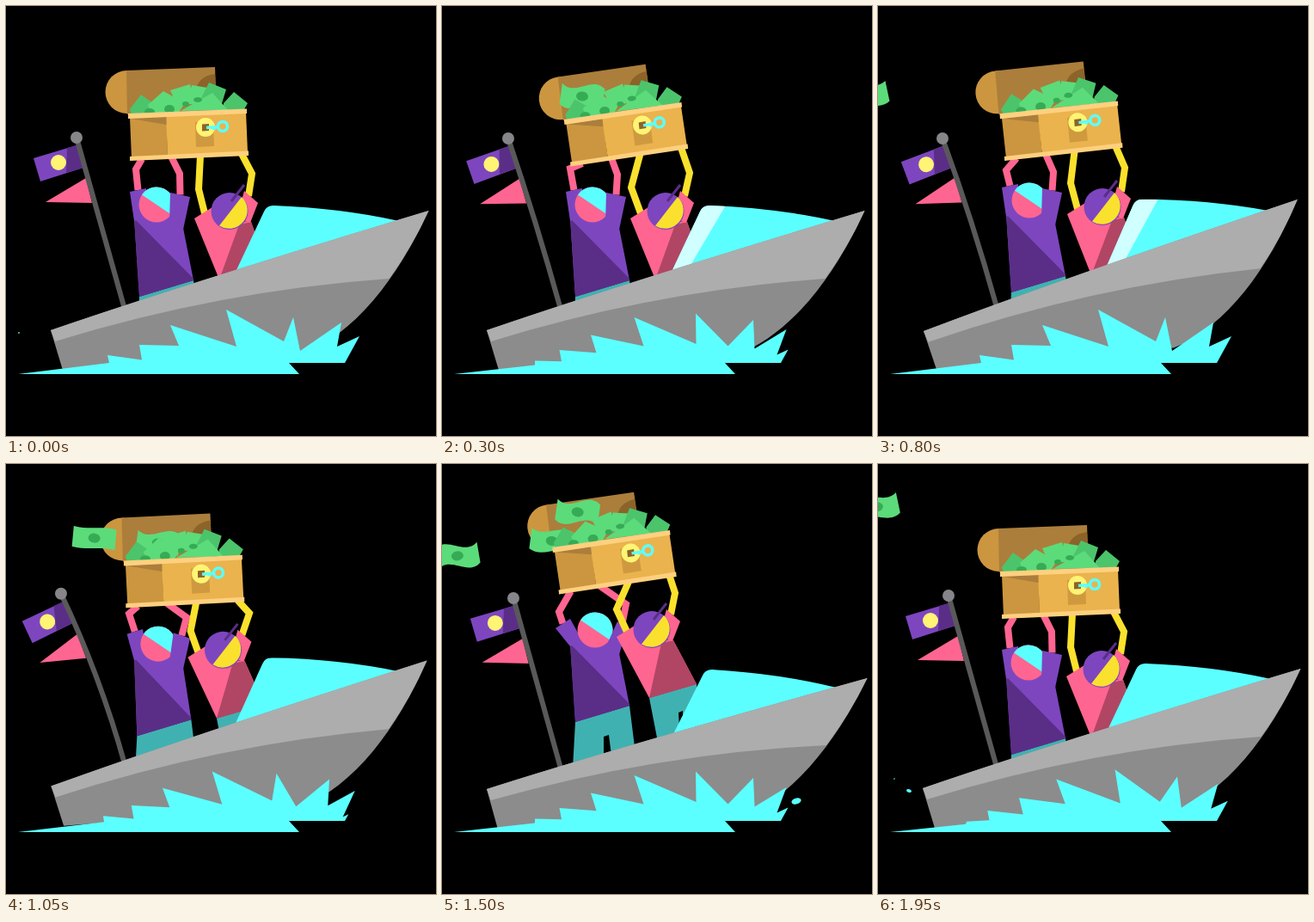
These frames come from a looping animation (500 by 500 pixels, 2 s). An HTML page:

```html
<!DOCTYPE html>
<html lang="en">
<head>
<meta charset="utf-8">
<title>Speedboat treasure</title>
<style>
html, body { margin: 0; width: 100%; height: 100%; overflow: hidden; background: #000; }
svg { display: block; width: 100vw; height: 100vh; }
.arm { fill: none; stroke-width: 8; stroke-linejoin: miter; }
.violet { fill: #7d46bf; } .plum { fill: #5a2e87; }
.pink { fill: #ff6591; } .rose { fill: #b04664; }
.cyan { fill: #5cffff; } .teal { fill: #40b1b1; } .yellow { fill: #fae12d; }
.gold { fill: #cb963f; } .brown { fill: #ab7e3c; } .rim { fill: #ffd07f; }
.leaf { fill: #5cdb7b; } .fern { fill: #4cc46b; } .moss { fill: #36ab55; }
</style>
</head>
<body>
<svg viewBox="0 0 500 500">
  <defs>
    <clipPath id="glass"><path d="M267 309L300 239Q303 232 311 232Q390 235 457 250L440 262Z"/></clipPath>
  </defs>

  <g id="pennant"><path class="pink" d="M93 200L46 228L100 229Z"/></g>
  <g id="flag">
    <path class="violet" d="M32 177L82 162L90 188L40 204Z"/>
    <path class="plum" d="M71 165L82 162L90 188L70 194Z"/>
    <circle cx="61" cy="182" r="9" fill="#fff473"/>
  </g>
  <path id="mast" fill="none" stroke="#595959" stroke-width="6"/>
  <circle id="ball" r="7" fill="#85858a"/>

  <path id="armA" class="arm" stroke="#ff6591"/>
  <path id="armB" class="arm" stroke="#ff6591"/>
  <path id="pantsL" class="teal"/>
  <path id="shirtL" class="violet"/>
  <path id="shadeL" class="plum"/>
  <path id="sleeveA" class="violet"/>
  <g id="headL">
    <circle class="pink" cx="175" cy="231" r="20.5"/>
    <path class="cyan" d="M158 219.500A20.500 20.500 0 0 1 192 242.500Z"/>
  </g>
  <path id="sleeveB" class="violet"/>

  <path id="armC" class="arm" stroke="#fae12d"/>
  <path id="armD" class="arm" stroke="#fae12d"/>
  <path id="pantsR" class="teal"/>
  <path id="shirtR" class="pink"/>
  <path id="shadeR" class="rose"/>
  <g id="headR">
    <path class="pink" d="M277 215L293 229L284 252L268 248Z"/>
    <circle class="violet" cx="260" cy="238.500" r="21.500"/>
    <path class="yellow" d="M274 222A21.300 21.300 0 0 1 248 255.500Z"/>
    <path d="M262 227L277 208" stroke="#5a2e87" stroke-width="3"/>
  </g>

  <g id="lid">
    <circle class="gold" cx="140.500" cy="100" r="25"/>
    <path class="brown" d="M140 75L243 71L245 122L141 126Z"/>
    <path fill="#8c6329" d="M243 79Q223 82 221 98L222 122L245 122Z"/>
  </g>
  <g id="bills"></g>
  <g id="chest">
    <path class="leaf" d="M191 98L214 91L219 112L198 114ZM216 92L234 95L232 114L211 114Z"/>
    <path class="fern" d="M236 89L256 97L249 120L224 113ZM144 120L157 103L178 118L170 127L146 127ZM265 100L281 113L276 122L252 122L253 113Z"/>
    <path class="leaf" d="M165 115L183 99L208 113L200 125L170 126ZM203 122L240 101L258 121Z"/>
    <g class="moss">
      <ellipse cx="167" cy="123" rx="6" ry="4"/>
      <ellipse cx="190" cy="120" rx="6" ry="5"/>
      <ellipse cx="223" cy="109" rx="5" ry="3"/>
      <ellipse cx="209" cy="114" rx="4" ry="3"/>
    </g>
    <path class="gold" d="M144 129L187 127L188 175L146 177Z"/>
    <path fill="#eab34d" d="M186 127L279 123L281 170L188 175Z"/>
    <path class="brown" d="M145 131L186.500 129L186.500 138Z"/>
    <path fill="#cf9a3f" d="M220 135L241 134L242 163L221 164Z"/>
    <path class="rim" d="M142 125L280 119.500V125L142 131ZM144 175L282 168.500V174L144 180Z"/>
    <circle cx="232" cy="141" r="11" fill="#fff473"/>
    <path fill="#8c6329" d="M228 137.500L236 137V145L228 145.500Z"/>
    <path d="M233 141.500L247 140.500M242 141V144" stroke="#5cffff" stroke-width="3.500"/>
    <circle cx="252" cy="140" r="5.500" fill="none" stroke="#5cffff" stroke-width="3.500"/>
  </g>

  <g id="boat">
    <g clip-path="url(#glass)">
      <path class="cyan" d="M250 220H470V330H250Z"/>
      <path id="glare" fill="#cfffff"/>
    </g>
    <path fill="#8c8c8c" d="M52 377Q200 326 491.500 238C455 317 405 382 342 406L66 423.500Z"/>
    <path fill="#adadad" d="M52 377Q200 326 491.500 238Q472 281 445.500 317Q248 331 57 390Z"/>
  </g>
  <path id="water" class="cyan"/>
  <g id="drops" class="cyan"></g>
</svg>

<script>
const LOOP = 2000, STEP = 50;
const el = id => document.getElementById(id);
const set = (id, name, value) => el(id).setAttribute(name, value);
const poly = points => 'M' + points.map(p => p.map(n => n.toFixed(2)).join(' ')).join('L');
const lerp = (a, b, u) => a.map((v, i) => v + (b[i] - v) * u);
const shift = (points, dx, dy) => points.map(([x, y]) => [x + dx, y + dy]);
const middle = (a, b) => lerp(a, b, 0.5);

// Smooth monotone interpolation of rows [time, ...values]
function sample(rows, t) {
  let i = 0;
  while (i < rows.length - 2 && t >= rows[i + 1][0]) i++;
  const a = rows[i], b = rows[i + 1], span = b[0] - a[0];
  const u = Math.min(1, Math.max(0, (t - a[0]) / span));
  const slope = (j, k) => (rows[j + 1][k] - rows[j][k]) / (rows[j + 1][0] - rows[j][0]);
  const tangent = (j, k) => {
    if (j === 0 || j === rows.length - 1) return 0;
    const p = slope(j - 1, k), q = slope(j, k);
    return p * q <= 0 ? 0 : 2 * p * q / (p + q);
  };
  const s = u * u * (3 - 2 * u);
  return a.slice(1).map((v, n) => {
    const k = n + 1;
    return v + (b[k] - v) * s
      + span * u * (1 - u) * ((1 - u) * tangent(i, k) - u * tangent(i + 1, k));
  });
}

function turn([x, y], [cx, cy], degrees) {
  const r = degrees * Math.PI / 180, c = Math.cos(r), s = Math.sin(r);
  return [cx + (x - cx) * c - (y - cy) * s, cy + (x - cx) * s + (y - cy) * c];
}

// chest x, y, angle | left head x, body y, hem x, sleeve bend
// right top x, body y, hem x | mast top x, y | four elbows
const rest   = [0, 0, 0, 0, 0, 0, 0, 0, 0, 0, 82, 153, 151, 190, 202, 195, 224, 213, 286, 195];
const tilt   = [2, -0.5, -6, 0, 0, 0, 0, 0, 0, 0, 77, 154, 149, 189, 204, 196, 220, 211, 288, 194];
const hop    = [0, -5.5, -2.1, 0, -14, 0, 0, 0, -13, 0, 67, 155, 146, 178, 207, 184, 219, 197, 288, 181];
const bump   = [1, -4.5, -3.8, 1, -5, 0, 0, 1, -5, 0, 75, 154, 149, 191, 204, 193, 224, 206, 287, 188];
const leap   = [-12, -35, -1.2, 5, -58, -7, 0.75, -19, -59, -8, 34, 148, 130, 149, 223, 151, 199, 163, 279, 138];
const landed = [-11.5, -35.5, -6, 3, -38, 0, 1, -16, -46, -7, 83, 156, 136, 172, 214, 163, 203, 169, 271, 150];
const poses = [[0, rest], [300, tilt], [500, hop], [650, rest], [800, bump], [950, rest],
  [1190, leap], [1250, leap], [1500, landed], [1780, rest], [LOOP, rest]].map(([t, p]) => [t, ...p]);

// time, angle, x, y
const hull = [[0, 0, 0, 0], [350, 0, 0, 0], [500, 0.8, 0.5, 0], [620, 0, 0, 0], [800, 1.85, 1, 1],
  [980, 0, 0, 0], [1230, 4.88, 2, -11], [1250, 4.88, 2, -11], [1400, -3, 0, 1],
  [1500, -1.3, 0, 1], [1620, 0.4, 0, 0], [1720, 0, 0, 0], [LOOP, 0, 0, 0]];
const STERN = [52, 377], CHEST = [212, 149.5], MAST = [138.4, 354];

function mastAt(base, top, u) {
  const c = [base[0] - 29, base[1] - 104];
  const a = lerp(base, c, u), b = lerp(c, top, u);
  return { c, p: lerp(a, b, u), angle: Math.atan2(b[1] - a[1], b[0] - a[0]) * 180 / Math.PI };
}

function drawMast(base, top) {
  const { c } = mastAt(base, top, 0);
  set('mast', 'd', `M${base}Q${c} ${top}`);
  set('ball', 'transform', `translate(${top})`);
  for (const [id, u] of [['flag', 0.887], ['pennant', 0.68]]) {
    const from = mastAt(MAST, [82, 153], u), to = mastAt(base, top, u);
    set(id, 'transform',
      `translate(${to.p}) rotate(${to.angle - from.angle}) translate(${-from.p[0]} ${-from.p[1]})`);
  }
}

function drawCrew(pose) {
  const [cx, cy, ca, lx, ly, lhem, bend, rx, ry, rhem] = pose;
  const hand = p => turn(p, CHEST, ca).map((v, i) => v + (i ? cy : cx));
  const elbow = n => pose.slice(12 + 2 * n, 14 + 2 * n);
  const arm = (id, n, grip, cuff) => set(id, 'd', poly([hand(grip), elbow(n), cuff]));

  // left figure
  const top = points => shift(points, 0, ly), hem = points => shift(points, lhem, ly);
  const [hemL, hemR] = hem([[155, 338], [218, 319]]);
  const [shoulder, neckL, neckR, armpit] = top([[149, 247], [158, 235], [192, 238], [206, 258]]);
  const cuffA = top([[144 - 12 * bend, 216 + 13 * bend], [163 - 14 * bend, 212 + 6 * bend]]);
  const cuffB = top([[191 + 13 * bend, 217 + 4 * bend], [214, 222 + 9 * bend]]);
  set('shirtL', 'd', poly([shoulder, neckL, neckR, armpit, hemR, hemL]));
  set('shadeL', 'd', poly([shoulder, [hemR[0] - 1, hemR[1] - 3], hemR, hemL]));
  set('pantsL', 'd', poly([hemL, hemR,
    ...hem([[225, 375], [198, 385], [194, 353], [188, 355], [188, 392], [152, 392]])]));
  set('sleeveA', 'd', poly([...cuffA, ...top([[164, 245], [149, 250]])]));
  set('sleeveB', 'd', poly([...cuffB, ...top([[206, 260], [190, 252]])]));
  set('headL', 'transform', `translate(${lx} ${ly})`);
  arm('armA', 0, [158, 178], middle(...cuffA));
  arm('armB', 1, [192, 175], middle(...cuffB));

  // right figure
  const up = points => shift(points, rx, ry), low = points => shift(points, rhem, ry);
  const [cuffL, cuffR, collar, side, chestMid] = up([[219, 247], [240, 234], [250, 250], [285, 251], [281, 252]]);
  const [waistL, waistR] = low([[248, 318], [303, 302]]);
  set('shirtR', 'd', poly([cuffL, cuffR, collar, side, waistR, waistL]));
  set('shadeR', 'd', poly([lerp(chestMid, side, -2.5), side, waistR, waistL]));
  set('pantsR', 'd', poly([waistL, waistR,
    ...low([[310, 375], [288, 375], [287, 333], [282, 335], [284, 375], [262, 390]])]));
  set('headR', 'transform', `translate(${rx} ${ry})`);
  arm('armC', 2, [226, 174], middle(cuffL, [cuffR[0] + 3, cuffR[1] + 1]));
  arm('armD', 3, [274, 172], up([[282, 221]])[0]);

  for (const id of ['lid', 'chest'])
    set(id, 'transform', `translate(${cx} ${cy}) rotate(${ca} ${CHEST})`);
}

// launch time, heights at ages 0, 200 and 480, extra spin
const bills = [[300, 105, 89, 104, 0], [879, 105, 85, 104, 26], [1089, 92, 78, 112, 0],
  [1400, 100, 79, 106, 0], [1485, 56, 46, 50, 0]];

function drawBills(t) {
  el('bills').innerHTML = bills.map(([start, y0, y1, y2, spin]) => {
    const age = t - start;
    if (age < -50 || age > 560) return '';
    const [y, angle] = sample([[0, y0, 8], [200, y1, 5], [480, y2, -12 + spin]], age);
    const w = 14 * Math.cos(age * Math.PI / 400);
    return `<g transform="translate(${163 - 0.353 * age} ${y}) rotate(${angle})">
      <path class="leaf" d="M-25-12C-8 ${-12 + w} 8 ${-12 - w} 25-12V12C8 ${12 - w}-8 ${12 + w}-25 12Z"/>
      <ellipse class="moss" rx="7" ry="5.500"/></g>`;
  }).join('');
}

// Each crest and trough slides to the next place once per cycle
const crests = [[394, 415], [411, 384], [390, 368], [334, 362], [256, 353], [191, 371],
  [155, 394], [118, 406], [98, 419]];
const troughs = [[394, 415], [385, 396], [342, 401], [323, 390], [268, 396], [201, 395],
  [158, 411.5], [120, 415], [96, 420]];

function drawWater(t) {
  const u = t % 200 / 200, edge = [];
  for (let k = 0; k < crests.length - 1; k++)
    edge.push(lerp(crests[k], crests[k + 1], u), lerp(troughs[k], troughs[k + 1], u));
  set('water', 'd', poly([[14, 428], [341, 428], [329, 415], [394, 415], ...edge]) + 'Z');
}

// first and last time, start x, y, step x, y, radius, shrink per step
const drops = [[1450, 1600, 405, 397, 7, -5, 6, 0.3], [1900, 1950, 57, 382, -21, -2, 4, 1],
  [1950, 1950, 19, 366, 0, 0, 1, 0], [2000, 2000, 15, 380, 0, 0, 1.2, 0]];

function drawDrops(t) {
  const now = t === 0 ? LOOP : t;
  el('drops').innerHTML = drops.map(([from, to, x, y, dx, dy, r, shrink]) => {
    if (now < from || now > to) return '';
    const n = (now - from) / STEP, size = r - shrink * n;
    const px = x + dx * n, py = y + dy * n;
    return `<ellipse cx="${px}" cy="${py}" rx="${size}" ry="${size * 0.6}"
      transform="rotate(${dx < 0 ? 20 : -15} ${px} ${py})"/>`;
  }).join('');
}

function drawGlare(t) {
  const start = [300, 800, 1200, 1700].find(s => t >= s - 50 && t <= s + 200);
  const x = start === undefined ? 0 : 331 + 1.38 * (t - start);
  set('glare', 'd', `M${x} 230h-47l-53 90h47Z`);
}

function render(t) {
  const pose = sample(poses, t);
  const [angle, dx, dy] = sample(hull, t);
  const base = turn(MAST, STERN, -angle);
  drawMast([base[0] + dx, base[1] + dy], pose.slice(10, 12));
  drawCrew(pose);
  drawBills(t);
  set('boat', 'transform', `translate(${dx} ${dy}) rotate(${-angle} ${STERN})`);
  drawGlare(t);
  drawWater(t);
  drawDrops(t);
}

function tick() {
  render(Math.floor(performance.now() % LOOP / STEP) * STEP);
  requestAnimationFrame(tick);
}
tick();
</script>
</body>
</html>
```
